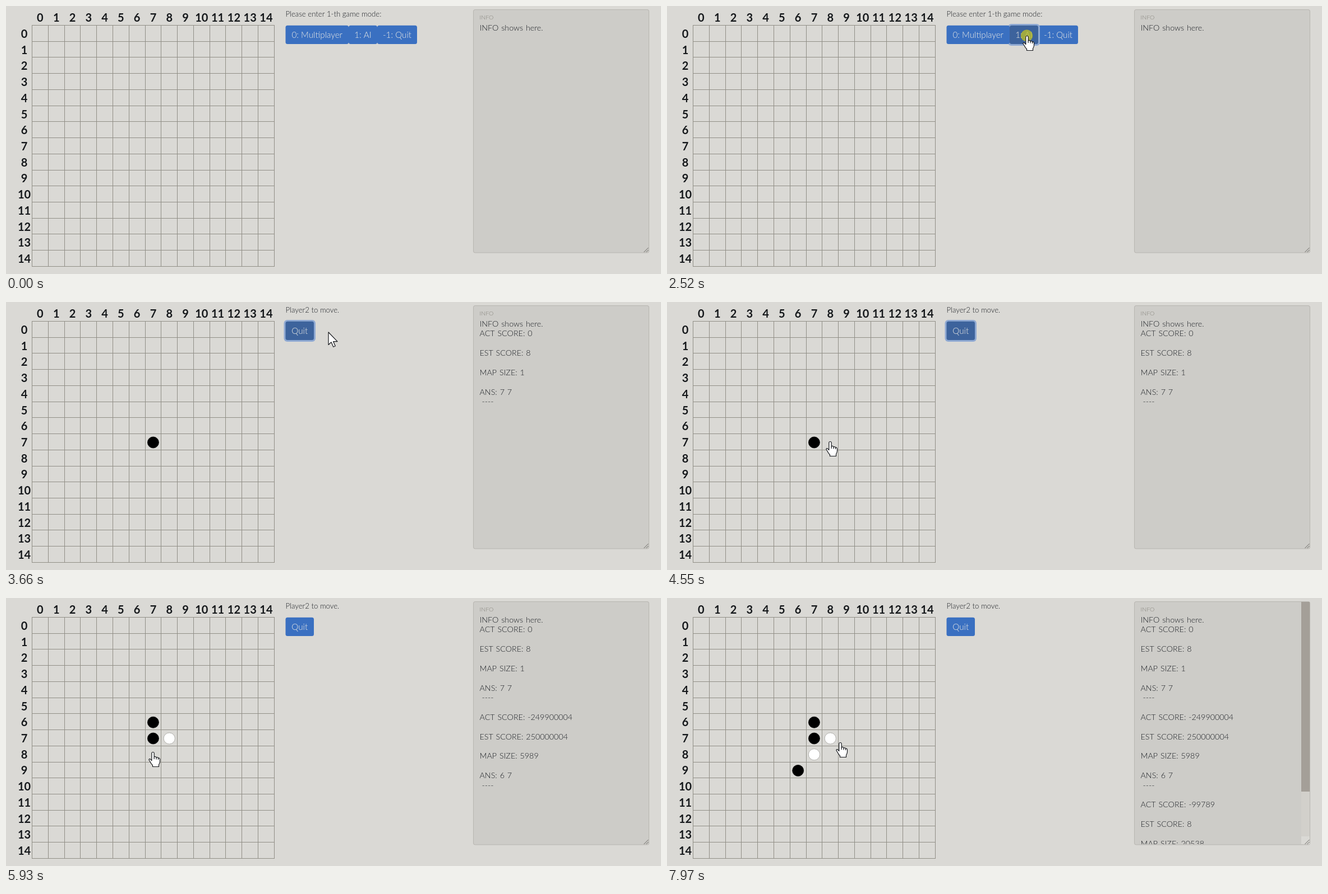
Write an HTML page with a canvas that moves like this. It is 1168 by 479 pixels and loops after 8000 ms.

```html
<!DOCTYPE html>
<html lang="en">
<head>
<meta charset="utf-8">
<title>Board game</title>
<style>
  html, body { margin: 0; width: 100%; height: 100%; overflow: hidden; background: #dad9d5; }
  canvas { display: block; }
</style>
</head>
<body>
<canvas id="stage" width="1168" height="479"></canvas>
<script>
const ctx = document.getElementById('stage').getContext('2d');
const LOOP = 8000, TICK = 120, CLICK_TIME = 130;
const FAMILY = 'Lato, "Open Sans", sans-serif';
const PAGE = '#dad9d5', INK = '#1d2025';
const AI_CLICK = 2520, FIRST_CLICK = 3400, GAME_START = 3660;

const colX = c => 46.5 + c * 28.79;
const rowY = r => 34.5 + r * 28.73;
const within = (t, a, b) => t >= a && t < b;

// Computer moves carry a report; the player's moves have none.
const MOVES = [
  { at: GAME_START, col: 7, row: 7, report: { act: 0, est: 8, size: 1 } },
  { at: 4800, col: 8, row: 7 },
  { at: 5300, col: 7, row: 6, report: { act: -249900004, est: 250000004, size: 5989 } },
  { at: 6180, col: 7, row: 8 },
  { at: 7600, col: 6, row: 9, report: { act: -99789, est: 8, size: 20538 } }
];
const movesBy = t => MOVES.filter(m => m.at <= t);

const PATH_START = { x: 630, y: 476 };
const PATH = [
  { at: 240, steps: 2, x: 630.5, y: 448 },
  { at: 1240, steps: 3, x: 628.5, y: 115.5 },
  { at: 1610, steps: 3, x: 642, y: 53 },
  { at: 2900, steps: 3, x: 575, y: 54 },
  { at: 4030, steps: 5, x: 291, y: 249 },
  { at: 4920, steps: 2, x: 376, y: 211 },
  { at: 5670, steps: 3, x: 262, y: 275 },
  { at: 6180, steps: 2, x: 316, y: 254 },
  { at: 6470, steps: 2, x: 334, y: 245 },
  { at: 7220, steps: 7, x: 309, y: 258 }
];

// The pointer eases towards each goal in hard steps.
function pointerAt(t) {
  let { x, y } = PATH_START;
  for (const goal of PATH) {
    if (t < goal.at) break;
    const step = Math.floor((t - goal.at) / TICK) + 1;
    const left = 1 - Math.min(1, step / goal.steps);
    const eased = 1 - left ** 1.6;
    x += (goal.x - x) * eased;
    y += (goal.y - y) * eased;
  }
  return { x, y };
}

function clicking(t) {
  return within(t, AI_CLICK, AI_CLICK + CLICK_TIME) ||
    within(t, FIRST_CLICK, GAME_START) ||
    MOVES.some(m => !m.report && within(t, m.at - CLICK_TIME, m.at));
}

function text(str, x, y, size, { color = INK, align = 'left', weight = 300 } = {}) {
  ctx.font = `${weight} ${size}px ${FAMILY}`;
  ctx.textAlign = align;
  ctx.fillStyle = color;
  ctx.fillText(str, x, y);
}

function box(x, y, w, h, color, r = 0) {
  ctx.beginPath();
  ctx.roundRect(x, y, w, h, r);
  ctx.fillStyle = color;
  ctx.fill();
}

function disc(x, y, r, fill, stroke = fill) {
  ctx.beginPath();
  ctx.arc(x, y, r, 0, Math.PI * 2);
  ctx.fillStyle = fill;
  ctx.fill();
  ctx.strokeStyle = stroke;
  ctx.lineWidth = 0.8;
  ctx.stroke();
}

function drawBoard(t) {
  for (let i = 0; i <= 15; i++) {
    box(Math.floor(colX(i)), 34, 1, 432, '#918f87');
    box(46, Math.floor(rowY(i)), 433, 1, '#918f87');
  }
  const label = { color: '#15181b', align: 'center', weight: 700 };
  for (let i = 0; i < 15; i++) {
    text(i, colX(i + 0.5), 27.5, 20, label);
    text(i, 32.5, rowY(i + 0.5) + 8, 20, label);
  }
  for (const { col, row, report } of movesBy(t)) {
    const x = colX(col + 0.5), y = rowY(row + 0.5) + 1;
    if (report) disc(x, y, 10, '#000');
    else disc(x, y, 10.1, '#fff', '#a5a4a0');
  }
}

function button(label, x, w, dark, ring) {
  if (ring) box(x - 3, 32, w + 6, 39, '#90aad3', 6);
  box(x, 34.7, w, 33.3, dark ? '#3d639c' : '#3a70c1', 3.5);
  text(label, x + w / 2, 56.5, 15.2, { color: '#efede7', align: 'center' });
}

const status = str => text(str, 498.5, 18.5, 13.2);

function drawMenu(t) {
  const aiDone = t >= AI_CLICK + CLICK_TIME, chosen = t >= FIRST_CLICK;
  status(`Please enter ${aiDone ? 2 : 1}-th game mode:`);
  button('-1: Quit', 662, 71);
  button('1: AI', 611, 51, t >= 1730 && !chosen, t >= AI_CLICK && !chosen);
  button('0: Multiplayer', 498.5, 112.5, t >= 3020, chosen);
}

function drawControls(t) {
  const played = movesBy(t);
  if (!played.length) return drawMenu(t);
  if (!played.at(-1).report) return status('Waiting...');
  const focused = played.length === 1;
  status('Player2 to move.');
  button('Quit', 498.5, 50.5, focused, focused);
}

function infoLines(t) {
  const blocks = movesBy(t).filter(m => m.report).map(({ row, col, report }) =>
    `ACT SCORE: ${report.act}\n\nEST SCORE: ${report.est}\n\n` +
    `MAP SIZE: ${report.size}\n\nANS: ${row} ${col}\n ----`);
  return ('INFO shows here.\n' + blocks.join('\n\n')).split('\n');
}

function drawInfo(t) {
  const lines = infoLines(t), lineHeight = 17.41;
  box(833, 6, 314, 435.5, '#b8b6b1', 4);
  box(834, 7, 312, 433.5, '#cdccc8', 3);
  text('INFO', 844.5, 23.5, 10.5, { color: '#85827b' });

  ctx.save();
  ctx.beginPath();
  ctx.rect(834, 7, 312, 433);
  ctx.clip();
  ctx.wordSpacing = '1px';
  lines.forEach((line, i) => text(line, 844.5, 43.7 + i * lineHeight, 14.3));
  ctx.wordSpacing = '0px';
  if (lines.length * lineHeight > 400) {
    box(1131, 7, 15, 434, '#d2d0cb');
    box(1131, 7, 15, 339, '#a49f98');
    box(1131, 426, 15, 15, PAGE);
  }
  ctx.restore();

  ctx.strokeStyle = '#66645f';
  ctx.lineWidth = 1;
  ctx.stroke(new Path2D('M1137.5 440L1145.5 432M1141.5 440L1145.5 436'));
}

const ARROW = new Path2D('M0 0V22.5L5 17.8L8.8 26.3L12.2 24.8L8.6 16.6H16Z');
const HAND = new Path2D('M-2.2 2.4Q-2 .5 0 .5T2.2 2.4V9Q4.5 7.5 6 10Q8.5 9 9.5 11' +
  'Q12 10.5 12.5 13V17.5Q12.3 20 10.5 23V26.5H-.5V24Q-3.5 21 -5 17.5' +
  'L-7 14.5Q-7 12 -4.8 12.8L-2.2 15.5Z');
const KNUCKLES = new Path2D('M2.2 9V13M6 10V13.5M9.5 11V14');

function drawPointer(t) {
  if (t < PATH[0].at) return;
  const { x, y } = pointerAt(t);
  if (clicking(t)) disc(x - 0.5, y, 10.2, 'rgba(188,190,40,0.78)');

  const overBoard = x < 479, overMenu = t < GAME_START && y < 68;
  const hand = overBoard || overMenu;
  const shape = hand ? HAND : ARROW;
  ctx.save();
  ctx.translate(x, y);
  ctx.fillStyle = '#fff';
  ctx.strokeStyle = '#16181c';
  ctx.lineWidth = 1.2;
  ctx.lineJoin = 'round';
  ctx.fill(shape);
  ctx.stroke(shape);
  if (hand) ctx.stroke(KNUCKLES);
  ctx.restore();
}

const start = performance.now();

function draw() {
  const t = (performance.now() - start) % LOOP;
  box(0, 0, 1168, 479, PAGE);
  drawBoard(t);
  drawControls(t);
  drawInfo(t);
  drawPointer(t);
  requestAnimationFrame(draw);
}
draw();
</script>
</body>
</html>
```
